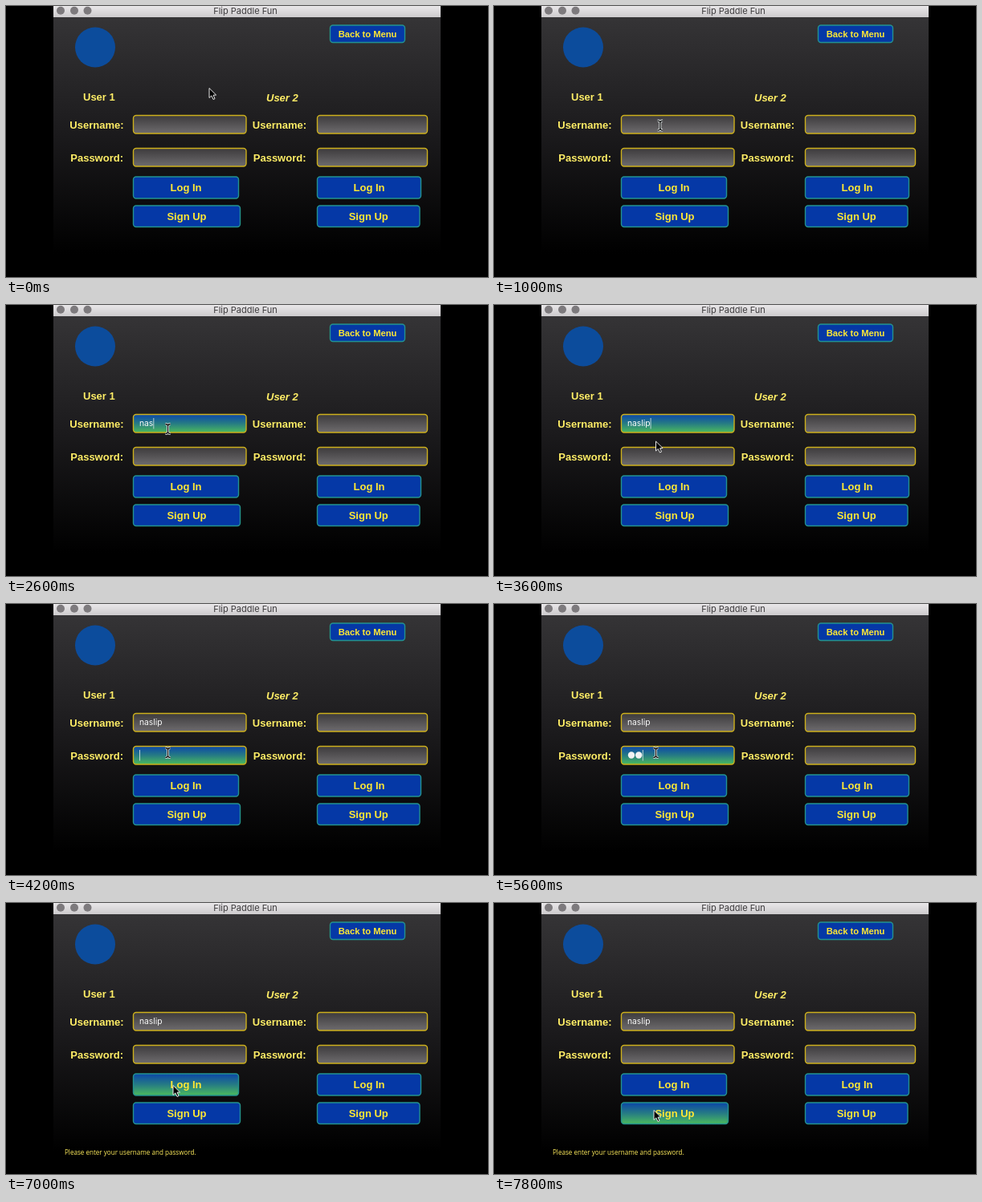
An HTML page with a canvas for the animation above (8 s loop, 600 by 338 pixels).

```html
<!DOCTYPE html>
<html lang="en">
<head>
<meta charset="utf-8">
<title>Login form</title>
<style>
  html, body { margin: 0; width: 100%; height: 100%; overflow: hidden; background: #000; }
  canvas { display: block; }
</style>
</head>
<body>
<canvas id="stage" width="600" height="338"></canvas>
<script>
const ctx = document.getElementById('stage').getContext('2d');
const LOOP = 8000, TICK = 200;
const SANS = '"Liberation Sans", Arial, sans-serif';
const INPUT_FONT = '10.3px Inter, sans-serif';
const YELLOW = '#ffee66';
const USERNAME = 'naslip';

const FOCUS_USER = 1400, FOCUS_PASS = 4000, LOGIN = 6800;
const USER_KEYS = [2200, 2400, 2600, 2800, 3000, 3200];
const PASS_KEYS = [5200, 5600, 5800, 6000];

// Pointer stops: time, x, y
const PATH = [
  [0, 253, 102.5], [200, 253, 102.5], [1200, 201.5, 154.5], [3400, 201.5, 154.5],
  [3800, 201.5, 185.5], [6200, 201.5, 185.5], [6600, 208, 227.5], [7200, 208, 227.5],
  [7600, 199, 258.5], [LOOP, 199, 258.5]
];

const fields = {
  user: [158, 136, 141.5, 23.5], pass: [158, 177, 141.5, 23.5],
  user2: [387, 136, 138, 23.5], pass2: [387, 177, 138, 23.5]
};
const buttons = [
  { label: 'Back to Menu', box: [403, 23.5, 94, 22.5], size: 11.2 },
  { label: 'Log In', box: [158, 212.5, 132, 28], size: 13 },
  { label: 'Log In', box: [387, 212.5, 130, 28], size: 13 },
  { label: 'Sign Up', box: [158, 248.5, 134, 27.5], size: 13 },
  { label: 'Sign Up', box: [387, 248.5, 128.5, 27.5], size: 13 }
];

function text(str, x, y, font, color, align = 'left') {
  ctx.font = font;
  ctx.fillStyle = color;
  ctx.textAlign = align;
  ctx.fillText(str, x, y);
}

function vertical(y, h, ...colors) {
  const g = ctx.createLinearGradient(0, y, 0, y + h);
  colors.forEach((c, i) => g.addColorStop(i / (colors.length - 1), c));
  return g;
}

const glow = (y, h) => vertical(y, h, '#0a44aa', '#267b84', '#4dbd5c');

function panel([x, y, w, h], fill, border) {
  ctx.beginPath();
  ctx.roundRect(x + .5, y + .5, w - 1, h - 1, 3.5);
  ctx.fillStyle = fill;
  ctx.fill();
  ctx.strokeStyle = border;
  ctx.lineWidth = 1.4;
  ctx.stroke();
}

function disc(x, y, r, color) {
  ctx.beginPath();
  ctx.arc(x, y, r, 0, Math.PI * 2);
  ctx.fillStyle = color;
  ctx.fill();
}

const inside = ([x, y, w, h], p) => p.x >= x && p.x <= x + w && p.y >= y && p.y <= y + h;

function pointerAt(t) {
  const i = PATH.findIndex(stop => stop[0] > t);
  const [t0, x0, y0] = PATH[i - 1], [t1, x1, y1] = PATH[i];
  const u = (t - t0) / (t1 - t0), e = u * u * (3 - 2 * u);
  return { x: x0 + (x1 - x0) * e, y: y0 + (y1 - y0) * e };
}

function drawWindow() {
  ctx.fillStyle = '#000';
  ctx.fillRect(0, 0, 600, 338);
  ctx.fillStyle = vertical(14, 295, '#353436', '#1b1a1c', '#000');
  ctx.fillRect(59, 14, 482, 324);
  ctx.fillStyle = vertical(0, 14, '#e9e7e9', '#cdcbcd');
  ctx.fillRect(59, 0, 482, 14);
  [68, 85, 101.5].forEach(x => disc(x, 5.8, 5, '#7d7a7d'));
  text('Flip Paddle Fun', 298, 9.8, '11px Inter, sans-serif', '#3c3a3c', 'center');
  disc(111, 51.5, 25, '#0c4c9c');
}

function drawLabels() {
  const bold = `bold 13px ${SANS}`;
  text('User 1', 96, 118, bold, YELLOW);
  text('User 2', 324, 118.5, `italic ${bold}`, YELLOW);
  for (const right of [146.5, 374]) {
    text('Username:', right, 153, bold, YELLOW, 'right');
    text('Password:', right - .5, 193.5, bold, YELLOW, 'right');
  }
}

function drawCaret(x, y, t, events) {
  const last = Math.max(...events.filter(e => e <= t));
  if ((t - last) % 1000 >= 500) return;
  ctx.fillStyle = '#b9d2d2';
  ctx.fillRect(x, y, 1, 13.5);
}

function drawFields(t) {
  const active = t >= FOCUS_USER && t < FOCUS_PASS ? 'user'
    : t >= FOCUS_PASS && t < LOGIN ? 'pass' : '';
  for (const [name, box] of Object.entries(fields)) {
    const fill = name === active ? glow(box[1], box[3]) : vertical(box[1], box[3], '#3b393b', '#6f6d6f');
    panel(box, fill, '#cdb01c');
  }

  const typed = USERNAME.slice(0, USER_KEYS.filter(k => k <= t).length);
  text(typed, 166, 151, INPUT_FONT, '#fafafa');
  if (active === 'user') drawCaret(166 + ctx.measureText(typed).width, 141, t, [FOCUS_USER, ...USER_KEYS]);

  if (active === 'pass') {
    const count = PASS_KEYS.filter(k => k <= t).length;
    for (let i = 0; i < count; i++) disc(171 + i * 9.2, 188.5, 4.2, '#f2f2f2');
    drawCaret(166 + count * 9.4, 182, t, [FOCUS_PASS, ...PASS_KEYS]);
  }
}

function drawButtons(pointer) {
  for (const { label, box, size } of buttons) {
    const [x, y, w, h] = box;
    panel(box, inside(box, pointer) ? glow(y, h) : '#0538a6', '#23928f');
    text(label, x + w / 2, y + h / 2 + size * .36, `bold ${size}px ${SANS}`, '#ffe834', 'center');
  }
}

function drawArrow() {
  ctx.beginPath();
  [[0, 0], [0, 12], [2.8, 9.4], [5, 14], [7, 13.1], [5, 8.7], [8.6, 8.5]]
    .forEach(([x, y]) => ctx.lineTo(x, y));
  ctx.closePath();
  ctx.fillStyle = '#000';
  ctx.fill();
  ctx.strokeStyle = '#e8e8e8';
  ctx.lineWidth = 1;
  ctx.stroke();
}

function drawBeam() {
  const strokes = new Path2D('M-3.2-6Q0-6 0-3.5Q0-6 3.2-6M0-3.5V3.5M-3.2 6Q0 6 0 3.5Q0 6 3.2 6');
  for (const [color, width] of [['#e8eeee', 3], ['#111', 1.3]]) {
    ctx.strokeStyle = color;
    ctx.lineWidth = width;
    ctx.stroke(strokes);
  }
}

function drawPointer(pointer) {
  ctx.save();
  ctx.translate(pointer.x, pointer.y);
  if (Object.values(fields).some(box => inside(box, pointer))) drawBeam();
  else drawArrow();
  ctx.restore();
}

function render(now) {
  const t = Math.floor(now % LOOP / TICK) * TICK;
  const pointer = pointerAt(t);
  drawWindow();
  drawLabels();
  drawFields(t);
  drawButtons(pointer);
  if (t >= LOGIN) {
    text('Please enter your username and password.', 73, 314, '8.1px "Open Sans", sans-serif', '#ffec5c');
  }
  drawPointer(pointer);
}

const start = performance.now();
function loop() {
  render(performance.now() - start);
  requestAnimationFrame(loop);
}
loop();
</script>
</body>
</html>
```
